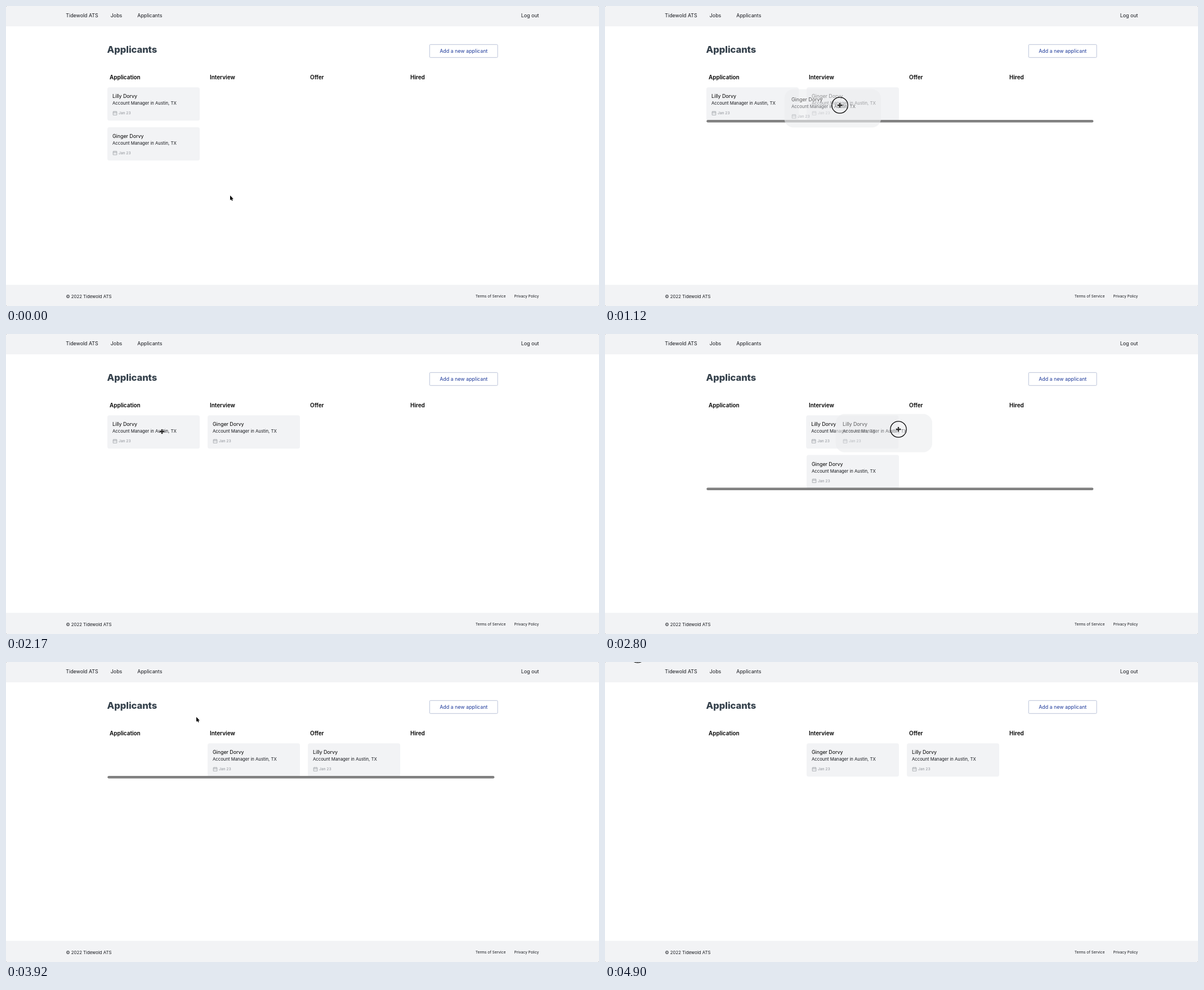
Write an HTML page that moves like this. It is 1053 px wide and 532 px high and loops after 4.97 s.

```html
<!DOCTYPE html>
<html lang="en">
<head>
<meta charset="utf-8">
<title>Applicants board</title>
<style>
  html, body { margin: 0; width: 100%; height: 100%; overflow: hidden; background: #666; }
  svg { display: block; width: 1053px; height: 532px; background: #fff; border-radius: 2px; }
  text { font-family: Inter, "Liberation Sans", sans-serif; font-size: 8.85px; fill: #16181d; white-space: pre; }
  .bar { fill: #f2f3f5; }
  .title { font-size: 16.6px; font-weight: 800; letter-spacing: -.005em; fill: #36424d; }
  .column { font-size: 9.95px; font-weight: 600; fill: #000; }
  .small { font-size: 7.75px; }
  .tiny { font-size: 6.65px; }
  .name { fill: #000; }
  .date { font-size: 6.65px; font-weight: 500; fill: #9a9da3; }
  .icon { fill: none; stroke: #9a9da3; stroke-width: .8; }
  .end { text-anchor: end; }
  .mid { text-anchor: middle; }
  .pointer path { stroke: #fff; stroke-width: .8; paint-order: stroke; }
</style>
</head>
<body>
<svg viewBox="0 0 1053 532">
  <rect class="bar" width="1053" height="36"/>
  <text x="106.3" y="19.8">Tidewold ATS</text>
  <text x="185.8" y="19.8">Jobs</text>
  <text x="233.3" y="19.8">Applicants</text>
  <text class="end" x="946.4" y="19.8">Log out</text>

  <text class="title" x="179.6" y="83">Applicants</text>
  <rect x="752.2" y="68.3" width="120.8" height="23" rx="1.5" fill="#fff" stroke="#b9c2d8"/>
  <text class="mid" x="812.7" y="83.1" style="fill:#1e3a9a">Add a new applicant</text>

  <g id="columns"></g>
  <g id="cards"></g>
  <rect id="scroll" x="180.3" width="687" height="4.6" rx="2.3" fill="#808080"/>
  <g id="ghosts"></g>

  <rect class="bar" y="494.5" width="1053" height="37.5"/>
  <text class="small" x="106.6" y="517.8">© 2022 Tidewold ATS</text>
  <text class="tiny" x="833.8" y="517.3">Terms of Service</text>
  <text class="tiny end" x="946.3" y="517.3">Privacy Policy</text>

  <g id="pointer" class="pointer">
    <path id="arrow" d="M0 0v8.4l1.9-1.7 1.3 2.8 1.4-.6-1.2-2.7h2.5z"/>
    <path id="cross" d="M0-4.6l1.9 2h-1.2v1.9h1.9v-1.2l2 1.9-2 1.9v-1.2h-1.9v1.9h1.2l-1.9 2-1.9-2h1.2v-1.9h-1.9v1.2l-2-1.9 2-1.9v1.2h1.9v-1.9h-1.2z"/>
    <circle id="ring" r="14.2" fill="none" stroke="#000" stroke-width="1.2"/>
  </g>
</svg>
<script>
const LOOP = 4970, STEP = 70, SLIDE = 150, FADE = 210;
const LEFT = 180, TOP = 144.3, COL = 178, ROW = 70.6;
const names = ['Lilly Dorvy', 'Ginger Dorvy'];

// hops: when the dragged card enters a column
const drags = [
  { card: 1, press: 560, lift: 700, drop: 1400, hide: 1400, hops: [{ at: 840, col: 1 }] },
  { card: 0, press: 2590, lift: 2660, drop: 3150, hide: 4130, hops: [{ at: 2660, col: 1 }, { at: 2870, col: 2 }] }
];
const hops = drags.flatMap(d => d.hops.map(h => ({ ...h, card: d.card })));

const rest = { x: 398, y: 336 };
const trips = [
  { from: 0, to: 420, x: 275, y: 241 },
  { from: 630, to: 1120, x: 417, y: 176 },
  { from: 1820, to: 2170, x: 277, y: 173 },
  { from: 2170, to: 2380, x: 288, y: 169 },
  { from: 2590, to: 2800, x: 521, y: 169 },
  { from: 2800, to: 3080, x: 610, y: 159 },
  { from: 3570, to: 3920, x: 338, y: 97.5 },
  { from: 4060, to: 4690, x: 58, y: -13 }
];

const $ = id => document.getElementById(id);
const clamp = v => Math.max(0, Math.min(1, v));
const mix = (a, b, p) => a + (b - a) * p;
const easeOut = p => 1 - (1 - p) ** 2;
const smooth = p => p * p * (3 - 2 * p);
const place = (el, x, y) => el.setAttribute('transform', `translate(${x} ${y})`);
const show = (el, opacity) => { el.style.opacity = +opacity; };

const cardText = name => `
  <text class="name" x="9" y="19">${name}</text>
  <text class="small" x="9" y="31.2">Account Manager in Austin, TX</text>
  <path class="icon" d="M10.2 43h6.6v6h-6.6zM10.2 45.2h6.6M12 42v1.6M15 42v1.6"/>
  <text class="date" x="20" y="48">Jan 23</text>`;
const group = back => names.map(n => `<g>${back}${cardText(n)}</g>`).join('');

$('columns').innerHTML = ['Application', 'Interview', 'Offer', 'Hired']
  .map((label, i) => `<text class="column" x="${LEFT + 4 + COL * i}" y="129.5">${label}</text>`).join('');
$('cards').innerHTML = group('<rect class="bar" width="164" height="59" rx="3.5"/>');
$('ghosts').innerHTML = group('<rect x="-3.5" y="-2.5" width="171.5" height="68" rx="16" fill="#edeef0"/>');

// Sideways motion brakes early, vertical motion eases at both ends.
function pointerAt(t) {
  let { x, y } = rest;
  for (const trip of trips) {
    const p = clamp((t - trip.from) / (trip.to - trip.from));
    x = mix(x, trip.x, easeOut(p));
    y = mix(y, trip.y, smooth(p));
  }
  return { x, y };
}

// Board after the first n hops; a moved card goes on top of its new column.
function layout(n) {
  let board = [[0, 1], [], []];
  for (const { card, col } of hops.slice(0, n)) {
    board = board.map(list => list.filter(c => c !== card));
    board[col].unshift(card);
  }
  const spots = names.map((_, card) => {
    const col = board.findIndex(list => list.includes(card));
    return { x: LEFT + COL * col, y: TOP + ROW * board[col].indexOf(card) };
  });
  return { spots, rows: Math.max(...board.map(list => list.length)) };
}

function draw(t) {
  const { x, y } = pointerAt(t);
  const n = hops.filter(h => h.at <= t).length;
  const now = layout(n), before = layout(Math.max(0, n - 1));
  const slide = n ? easeOut(clamp((t - hops[n - 1].at) / SLIDE)) : 1;
  now.spots.forEach((spot, i) => {
    const old = before.spots[i];
    place($('cards').children[i], mix(old.x, spot.x, slide), mix(old.y, spot.y, slide));
  });

  let scroll = 0, pressed = t >= 4900;
  for (const d of drags) {
    const ghost = $('ghosts').children[d.card];
    const home = layout(hops.filter(h => h.at < d.press).length).spots[d.card];
    const grab = pointerAt(d.press);
    place(ghost, home.x + x - grab.x, home.y + y - grab.y);
    show(ghost, t >= d.lift ? .62 * clamp((d.drop + STEP - t) / FADE) : 0);
    if (t >= d.hops[0].at) scroll = clamp(1 - (t - d.hide) / FADE);
    pressed ||= t >= d.press && t < d.drop;
  }
  $('scroll').setAttribute('y', TOP - 13 + ROW * now.rows);
  show($('scroll'), scroll);

  const overCards = y > TOP && y < TOP + 2 * ROW - 11;
  place($('pointer'), x, y);
  show($('arrow'), !overCards && y > 0);
  show($('cross'), overCards);
  show($('ring'), pressed);
}

const start = performance.now();
function tick(now) {
  const t = Math.max(0, now - start) % LOOP;
  draw(Math.floor(t / STEP) * STEP);
  requestAnimationFrame(tick);
}
draw(0);
requestAnimationFrame(tick);
</script>
</body>
</html>
```
